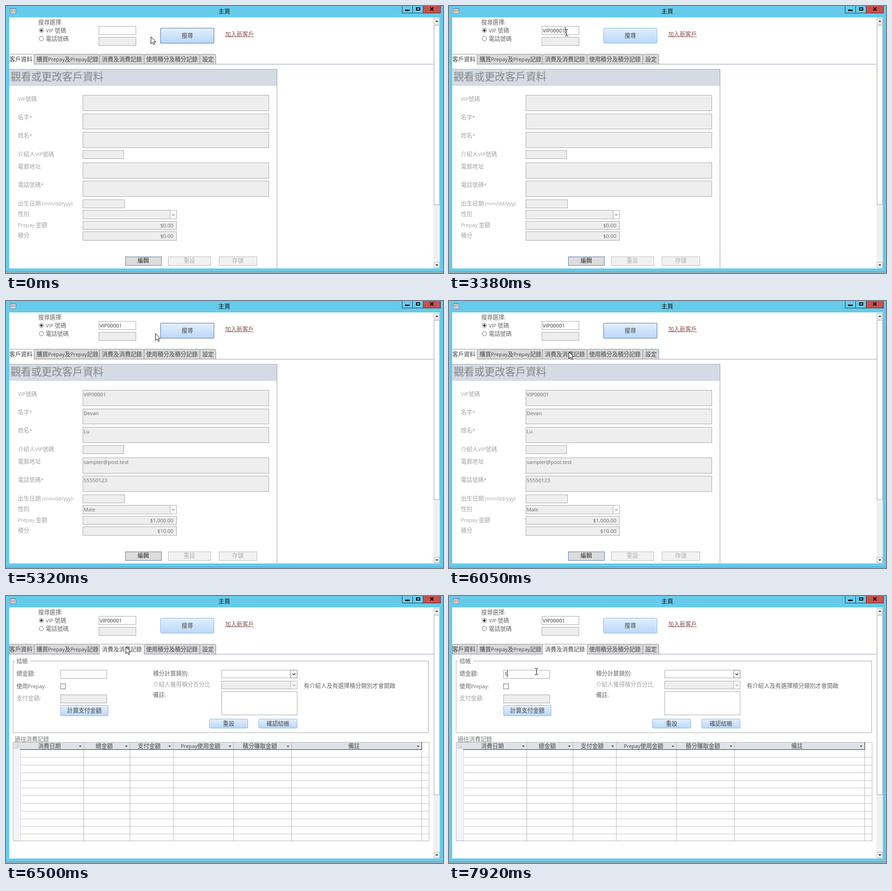
An HTML page with a canvas that plays this animation: 957 by 585 pixels, repeating every 8000 ms.

```html
<!DOCTYPE html>
<html lang="zh-Hant">
<head>
<meta charset="utf-8">
<style>
html, body { margin: 0; width: 100%; height: 100%; overflow: hidden; background: #66cbea; }
canvas { display: block; }
</style>
</head>
<body>
<canvas id="stage" width="957" height="585"></canvas>
<script>
const c = document.getElementById('stage').getContext('2d');
const LOOP = 8000;
const INK = '#444', LABEL = '#666', DIM = '#a3a3a3', VALUE = '#6a6a6a', EDGE = '#a6a6a6', GREY = '#eee';

// ---------- drawing helpers ----------
function fill(x, y, w, h, color) {
  c.fillStyle = color;
  c.fillRect(x, y, w, h);
}

// Box given by its outer pixel edges, with a crisp 1px border.
function box(x1, y1, x2, y2, color, edge = EDGE) {
  fill(x1, y1, x2 - x1 + 1, y2 - y1 + 1, edge);
  fill(x1 + 1, y1 + 1, x2 - x1 - 1, y2 - y1 - 1, color);
}

function poly(points, color, edge) {
  c.beginPath();
  points.forEach(([x, y]) => c.lineTo(x, y));
  c.closePath();
  c.fillStyle = color;
  c.fill();
  if (edge) {
    c.strokeStyle = edge;
    c.lineWidth = 1;
    c.stroke();
  }
}

function setFont(run, size, weight) {
  c.font = run.charCodeAt(0) < 256
    ? `${weight} ${size * 0.9}px "Open Sans", "Noto Sans", sans-serif`
    : `${weight} ${size}px "Noto Sans CJK TC", "Noto Sans CJK", sans-serif`;
}

// Text centred vertically on y; align 0 left, 0.5 centre, 1 right. Returns its width.
function text(s, x, y, color = LABEL, align = 0, size = 12.55, weight = 400) {
  const runs = s.match(/[\x00-\xff]+|[^\x00-\xff]+/g) || [];
  const widths = runs.map(run => {
    setFont(run, size, weight);
    return c.measureText(run).width;
  });
  const total = widths.reduce((a, b) => a + b, 0);
  let left = x - total * align;
  c.fillStyle = color;
  runs.forEach((run, i) => {
    setFont(run, size, weight);
    c.fillText(run, left, Math.round(y + size * 0.36));
    left += widths[i];
  });
  return total;
}

function input(s, x, y, caret) {
  const w = text(s, x, y, '#333');
  if (caret) fill(Math.round(x + w), y - 7, 1, 15, '#000');
}

function glossy(x1, y1, x2, y2, label, focus, hover) {
  const g = c.createLinearGradient(0, y1, 0, y2);
  g.addColorStop(0, hover ? '#edf5fe' : '#e3effd');
  g.addColorStop(1, hover ? '#c8e1fb' : '#b9d8f9');
  c.beginPath();
  c.roundRect(x1 + .5, y1 + .5, x2 - x1 - 1, y2 - y1 - 1, 2.5);
  c.fillStyle = g;
  c.fill();
  c.lineWidth = 1;
  c.strokeStyle = '#8db2de';
  c.stroke();
  if (focus) {
    c.setLineDash([1, 1]);
    c.lineDashOffset = .5;
    c.strokeStyle = '#16324f';
    c.strokeRect(x1 + .5, y1 + .5, x2 - x1 - 1, y2 - y1 - 1);
    c.setLineDash([]);
  }
  text(label, (x1 + x2) / 2, (y1 + y2) / 2 - .5, INK, .5);
}

function combo(x1, y1, x2, y2, color, ink) {
  box(x1, y1, x2, y2, color);
  box(x2 - 14, y1, x2, y2, '#fff', ink === DIM ? EDGE : '#777');
  const x = x2 - 6.5, y = (y1 + y2) / 2 + .5;
  c.beginPath();
  c.moveTo(x - 3, y - 1.5);
  c.lineTo(x, y + 2);
  c.lineTo(x + 3, y - 1.5);
  c.strokeStyle = ink;
  c.lineWidth = 1.6;
  c.stroke();
}

function radio(x, y, on) {
  c.beginPath();
  c.arc(x, y, 4.8, 0, 7);
  c.fillStyle = '#fff';
  c.fill();
  c.strokeStyle = '#666';
  c.lineWidth = 1;
  c.stroke();
  if (!on) return;
  c.beginPath();
  c.arc(x, y, 2.6, 0, 7);
  c.fillStyle = '#222';
  c.fill();
}

// ---------- window parts ----------
function drawWindow() {
  fill(0, 0, 957, 585, '#66cbea');
  fill(0, 583, 957, 1, '#2f5f70');
  fill(0, 584, 957, 1, '#fff');
  fill(7, 25, 943, 550, '#fff');
  box(9, 5, 21, 16, '#f7f7fa', '#6f7789');
  fill(10, 6, 11, 2, '#a9b6cd');
  for (const y of [9, 12]) {
    fill(11, y, 4, 2, '#c0706c');
    fill(16, y, 4, 2, '#8a93a8');
  }
  text('主頁', 478, 11, '#111', .5, 13);

  box(867, -1, 890, 15, '#66cbea', '#1d3a44');
  box(890, -1, 913, 15, '#66cbea', '#1d3a44');
  box(913, -1, 951, 15, '#c75050', '#5d2a2a');
  fill(874, 8, 10, 3, '#000');
  fill(898, 3, 9, 7, '#000');
  fill(900, 5, 5, 3, '#66cbea');
  c.strokeStyle = '#000';
  c.lineWidth = 1.9;
  c.beginPath();
  c.moveTo(929, 3); c.lineTo(936, 10);
  c.moveTo(936, 3); c.lineTo(929, 10);
  c.stroke();

  fill(936, 25, 14, 550, '#f0f0f0');
  box(937, 27, 949, 39, '#fff', '#b0b0b0');
  box(937, 42, 949, 435, '#fff', EDGE);
  box(937, 561, 949, 573, '#fff', '#b0b0b0');
  poly([[940, 35], [943.5, 31], [947, 35]], '#444');
  poly([[940, 566], [943.5, 570], [947, 566]], '#444');
}

function drawSearch(query, caret, focus, hover) {
  text('搜尋選擇:', 70.5, 35);
  radio(77.5, 53.5, true);
  radio(77.5, 71.5, false);
  text('VIP 號碼', 87, 53.5);
  text('電話號碼', 87, 71.5);
  box(203, 44, 284, 62, '#fff');
  box(203, 68, 284, 86, GREY);
  input(query, 205, 53, caret);
  glossy(338, 48, 456, 82, '搜尋', focus, hover);
  const w = text('加入新客戶', 480, 61, '#87504e');
  fill(480, 67, w, 1, '#87504e');
}

const TABS = [
  ['客戶資料', 7, 61, 7.5], ['購買Prepay及Prepay記錄', 61, 204, 67], ['消費及消費記錄', 204, 302, 210],
  ['使用積分及積分記錄', 302, 424, 307], ['設定', 424, 459, 430]
];

function drawTabs(active) {
  fill(7, 127, 929, 1, '#8f9bb3');
  TABS.forEach(([label, x1, x2, tx], i) => {
    c.beginPath();
    c.roundRect(x1 + .5, 105.5, x2 - x1, 22, [3, 3, 0, 0]);
    c.fillStyle = i === active ? '#fff' : '#d8d8d8';
    c.fill();
    c.strokeStyle = '#8a919d';
    c.lineWidth = 1;
    c.stroke();
    if (i === active) fill(x1 + 1, 126, x2 - x1 - 1, 3, '#fff');
    text(label, tx, 116.5, INK);
  });
  if (!active) fill(7, 106, 1, 22, '#fff');
}

// Tab strip while it is being repainted.
function drawBareTabs() {
  for (const [, x1, x2] of TABS) fill(x1 + (x1 > 7 ? 2 : 0), 105, x2 - x1 - 3, 1, '#8a919d');
  fill(7, 127, 929, 1, '#8f9bb3');
}

const FIELDS = [
  // label, label y, box top, bottom, right, customer value
  ['VIP號碼', 203, 195, 229, 575, 'VIP00001'],
  ['名字*', 243.5, 236, 269, 575, 'Devan'],
  ['姓名*', 283.5, 276, 310, 575, 'Lu'],
  ['介紹人VIP號碼', 324, 316, 334, 257, ''],
  ['電郵地址', 351, 343, 377, 575, 'sampler@post.test'],
  ['電話號碼*', 391, 383, 417, 575, '55550123'],
  ['出生日期 (mm/dd/yyy)', 432, 424, 442, 259, ''],
  ['性別', 455, 447, 466, 373, 'Male']
];

function flat(x1, x2, label, enabled) {
  box(x1, 549, x2, 568, enabled ? '#dcdcdc' : '#f2f2f2', enabled ? '#5a7ba8' : '#b8b8b8');
  text(label, (x1 + x2) / 2, 557.5, enabled ? '#333' : '#b0b0b0', .5, 12.55, enabled ? 500 : 400);
}

function drawCustomer(found) {
  fill(7, 138, 587, 37, '#d5dbe4');
  fill(7, 138, 587, 1, '#a3a8b0');
  fill(593, 138, 1, 437, '#999');
  text('觀看或更改客戶資料', 10, 155, '#868686', 0, 22.6, 300);
  for (const [label, y, top, bottom, right, value] of FIELDS) {
    text(label, 26, y, DIM);
    if (label === '性別') combo(168, top, right, bottom, GREY, DIM);
    else box(168, top, right, bottom, GREY);
    if (found) text(value, 170, top + 9.5, VALUE);
  }
  text('Prepay 金額', 26, 479, DIM);
  text('積分', 26, 502, DIM);
  box(168, 471, 373, 489, GREY);
  box(168, 494, 373, 513, GREY);
  text(found ? '$1,000.00' : '$0.00', 366.5, 480, VALUE, 1);
  text(found ? '$10.00' : '$0.00', 366.5, 503.5, VALUE, 1);
  flat(261, 340, '編輯', true);
  flat(355, 448, '重設');
  flat(466, 549, '存儲');
}

const COLUMNS = [
  ['消費日期', 170, 95], ['總金額', 271, 215], ['支付金額', 366, 313.5],
  ['Prepay使用金額', 498, 426], ['積分賺取金額', 625, 556], ['備註', 910, 762]
];

function drawBilling(amount, caret) {
  box(15, 142, 925, 299, '#fff');
  fill(20, 141, 33, 3, '#fff');
  text('結帳', 23, 142.5);
  text('總金額:', 23, 169.5);
  text('使用Prepay:', 23, 197);
  text('支付金額:', 23, 223.5, DIM);
  box(119, 162, 220, 180, '#fff');
  input(amount, 121, 170, caret);
  box(119, 192, 130, 203, '#fff', '#666');
  box(119, 216, 220, 234, GREY);
  glossy(119, 239, 224, 263, '計算支付金額');
  text('積分計算類別:', 322, 169.5);
  text('介紹人獲得積分百分比', 322, 193, DIM);
  text('備註:', 322, 216.5);
  combo(472, 162, 637, 179, '#fff', '#333');
  combo(472, 186, 637, 203, GREY, DIM);
  box(472, 209, 637, 260, '#fff');
  text('有介紹人及有選擇積分類別才會開啟', 652, 196);
  glossy(445, 269, 530, 290, '重設');
  glossy(553, 269, 638, 290, '確認結帳');

  text('過往消費記錄', 19, 313.5, '#777');
  box(15, 320, 926, 536, '#fff', '#b0b0b0');
  fill(16, 321, 894, 15, '#dfe3e8');
  fill(16, 337, 16, 199, '#f3f3f9');
  poly([[20, 333], [28, 333], [28, 325]], '#cfd4db');
  for (let i = 1; i < 12; i++) fill(31, Math.floor(336.8 + i * 16.8), 895, 1, '#c0c0c0');
  fill(31, 337, 1, 199, '#d5d5dc');
  for (const [label, x, mid] of COLUMNS) {
    fill(x, 320, 1, 217, '#b8b8b8');
    text(label, mid, 328.5, INK, .5);
    poly([[x - 10, 328], [x - 5, 328], [x - 7.5, 331]], '#222');
  }
  fill(31, 336, 880, 1, '#222');
  fill(910, 320, 1, 17, '#222');
}

// ---------- pointer ----------
// start, end, number of steps, target x, target y
const MOVES = [
  [220, 600, 6, 257, 58], [4090, 4540, 7, 341, 62], [5210, 5980, 11, 263, 111],
  [6050, 6051, 1, 262, 111], [6860, 6930, 2, 229, 131], [7070, 7430, 6, 191, 165]
];

function pointerAt(t) {
  let x = 317, y = 67;
  for (const [t0, t1, n, tx, ty] of MOVES) {
    if (t < t0) break;
    const k = Math.min(n, Math.floor((t - t0) / (t1 - t0) * (n - 1) + 1e-6) + 1) / n;
    x += (tx - x) * k;
    y += (ty - y) * k;
  }
  return [Math.round(x), Math.round(y)];
}

function drawPointer(x, y, beam) {
  if (beam) {
    fill(x, y - 6, 1, 13, '#000');
    for (const dy of [-7, 7]) {
      fill(x - 3, y + dy, 3, 1, '#000');
      fill(x + 1, y + dy, 3, 1, '#000');
    }
    return;
  }
  const shape = [[0, 0], [0, 15], [3.5, 11.8], [6, 17], [8.3, 16], [6, 11], [10.5, 11]];
  poly(shape.map(([dx, dy]) => [x + dx + .5, y + dy + .5]), '#fff', '#000');
}

// ---------- timeline ----------
const KEYS = [1610, 1760, 1960, 2390, 2610, 2750, 3190, 3380];
const within = (t, a, b) => t >= a && t < b;

function draw(t) {
  const [x, y] = pointerAt(t);
  const query = 'VIP00001'.slice(0, KEYS.filter(k => t >= k).length);
  const queryCaret = within(t, 600, 1180) || within(t, 1610, 3870) || within(t, 4400, 4730);
  const focus = t < 600 || within(t, 4730, 6400);
  const hover = within(x, 338, 456) && within(y, 48, 82);

  drawWindow();
  drawSearch(query, queryCaret, focus, hover);
  if (within(t, 6400, 6500)) {
    drawBareTabs();
    c.save();
    c.beginPath();
    c.rect(7, 321, 929, 215);
    c.clip();
    drawCustomer(true);
    c.restore();
  } else if (t < 6400) {
    drawTabs(0);
    if (!within(t, 4800, 4940)) drawCustomer(t >= 4940);
  } else {
    drawTabs(2);
    drawBilling(t >= 7920 ? '1' : '', t >= 7490);
  }

  const inQuery = within(x, 203, 285) && within(y, 44, 63);
  const inAmount = t >= 6500 && within(x, 119, 221) && within(y, 162, 181);
  drawPointer(x, y, inQuery || inAmount);
}

const start = performance.now();
function tick(now) {
  draw(Math.max(0, now - start) % LOOP);
  requestAnimationFrame(tick);
}
draw(0);
requestAnimationFrame(tick);
</script>
</body>
</html>
```
